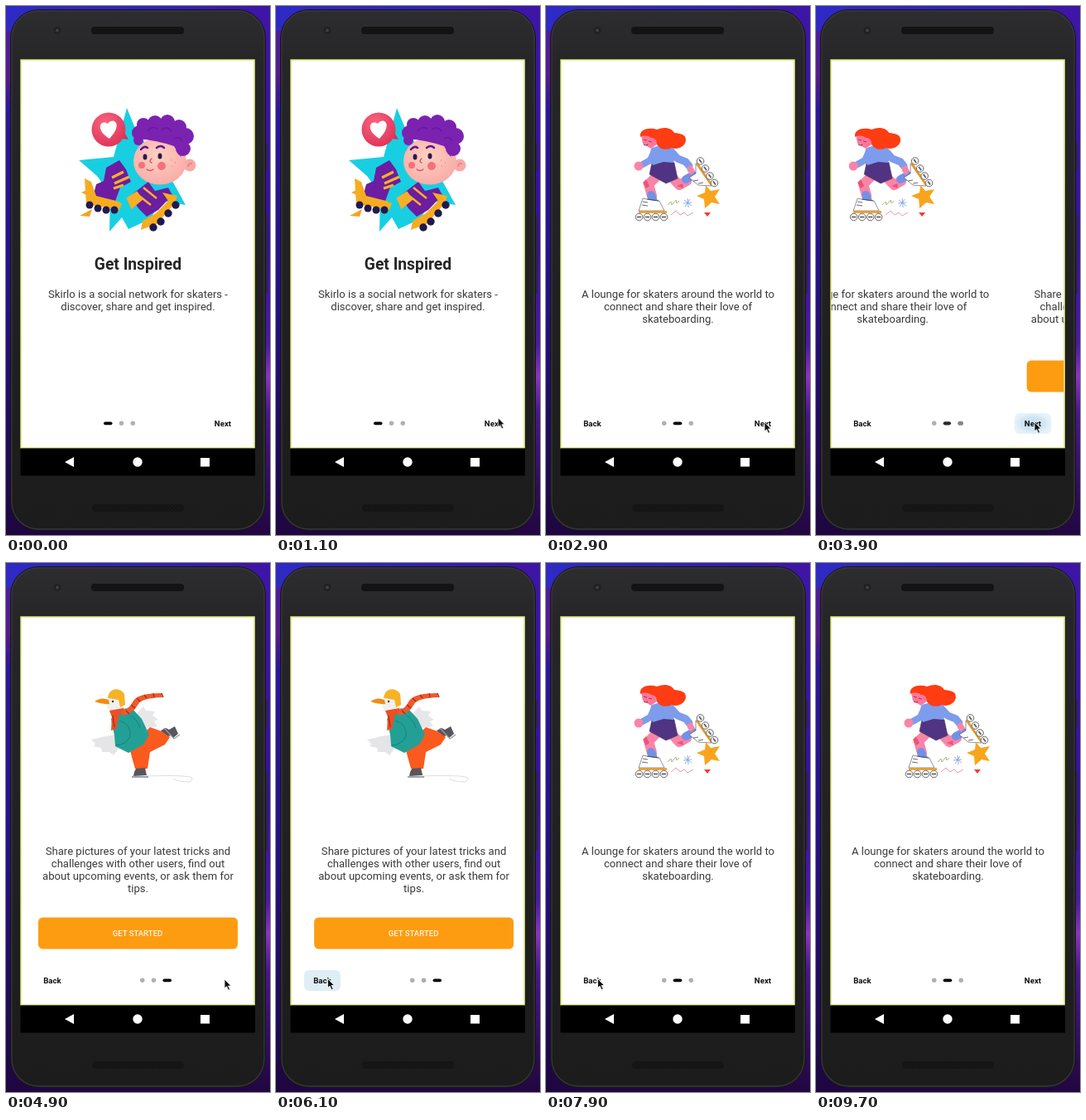
Animation of 319x638 px, one loop 9800 ms. Source, as an HTML page:

```html
<!DOCTYPE html>
<html lang="en">
<head>
<meta charset="utf-8">
<title>Skater onboarding</title>
<style>
  html, body { margin: 0; width: 100%; height: 100%; overflow: hidden; background: #1c1260; }
  svg { display: block; width: 100vw; height: 100vh; }
  text { font-family: Roboto, "Open Sans", sans-serif; }
  .title { font-size: 19.3px; font-weight: 700; fill: #252527; text-anchor: middle; }
  .body { font-size: 13.1px; fill: #39393b; text-anchor: middle; }
  .btn { font-size: 9.7px; font-weight: 700; fill: #111; text-anchor: middle; }
  .cta { font-size: 9.6px; font-weight: 500; fill: #fff6e4; text-anchor: middle; }
  .limb { fill: none; stroke-linecap: round; stroke-linejoin: round; }
</style>
</head>
<body>
<svg viewBox="0 0 319 638" xmlns="http://www.w3.org/2000/svg">
  <defs>
    <linearGradient id="sky" x2="0" y2="1">
      <stop offset="0" stop-color="#2f2ac4"/>
      <stop offset=".05" stop-color="#4c1e98"/>
      <stop offset=".13" stop-color="#561c88"/>
      <stop offset=".2" stop-color="#2c169a"/>
      <stop offset=".5" stop-color="#25128a"/>
      <stop offset=".75" stop-color="#220c66"/>
      <stop offset="1" stop-color="#1e0640"/>
    </linearGradient>
    <linearGradient id="top">
      <stop offset="0" stop-color="#2f2ac4"/>
      <stop offset=".6" stop-color="#3220bc"/>
      <stop offset="1" stop-color="#3d16a6"/>
    </linearGradient>
    <linearGradient id="edge" x2="0" y2="1">
      <stop offset="0" stop-color="#3d16a6"/>
      <stop offset=".45" stop-color="#36129c"/>
      <stop offset=".64" stop-color="#4a1c9e"/>
      <stop offset=".7" stop-color="#8a35bd"/>
      <stop offset=".77" stop-color="#4a1788"/>
      <stop offset="1" stop-color="#210640"/>
    </linearGradient>
    <linearGradient id="shell" x2="0" y2="1">
      <stop offset="0" stop-color="#2d2d2f"/>
      <stop offset=".1" stop-color="#262628"/>
      <stop offset=".85" stop-color="#1d1d1e"/>
      <stop offset="1" stop-color="#1c1c1d"/>
    </linearGradient>
    <radialGradient id="bubble" cx=".4" cy=".3" r=".8">
      <stop offset="0" stop-color="#f9647c"/>
      <stop offset="1" stop-color="#dd2f57"/>
    </radialGradient>
    <radialGradient id="skin" cx=".45" cy=".4" r=".65">
      <stop offset="0" stop-color="#ffd0c2"/>
      <stop offset="1" stop-color="#f9aaa6"/>
    </radialGradient>
    <radialGradient id="splash">
      <stop offset="0" stop-color="#c6e0f0"/>
      <stop offset=".55" stop-color="#cde4f2"/>
      <stop offset="1" stop-color="#e6f2f9"/>
    </radialGradient>
    <pattern id="mesh" width="4" height="4" patternUnits="userSpaceOnUse">
      <rect width="4" height="4" fill="#131314"/>
      <path d="M0 4 4 0" stroke="#1d1d1e" stroke-width=".8"/>
    </pattern>
    <clipPath id="view"><rect x="18" y="65" width="282.5" height="468"/></clipPath>
  </defs>

  <!-- wallpaper and handset -->
  <rect width="319" height="638" fill="url(#sky)"/>
  <rect width="319" height="30" fill="url(#top)"/>
  <rect x="285" width="34" height="638" fill="url(#edge)"/>
  <path d="M313 165h2.6v33h-2.6zM313 251h2.6v96h-2.6z" fill="#29292c"/>
  <rect x="5.5" y="4.500" width="308" height="628" rx="34" fill="url(#shell)" stroke="#151517"/>
  <rect x="7" y="6" width="305" height="625" rx="32.500" fill="none" stroke="#373739" stroke-width="1.300"/>
  <circle cx="62" cy="29.500" r="4.500" fill="#202022"/>
  <circle cx="62" cy="29.500" r="2" fill="#3f4045"/>
  <rect x="103" y="25" width="112" height="9" rx="4" fill="#131314"/>
  <rect x="104" y="601" width="111" height="9" rx="4" fill="url(#mesh)"/>

  <rect x="18" y="65" width="282.500" height="468" fill="#fff"/>
  <g clip-path="url(#view)">
    <g id="p0">
      <path d="M146 123l12 29 38 50 21 38-29-5-14 22-26 12-8-14-15 17 1-45-16-22-22-19 42-4z" fill="#18cfe2"/>
      <path d="M91 225l12-6-5 9zM89 253l15-8-3 9z" fill="#f5a31b"/>
      <path d="M121 195l16-9 8 11 6 15-13 7-7 19-27-4 5-19 9-4z" fill="#6c1da1"/>
      <path d="M128 207l14-7M131 214l18-8M130 220l12-4" fill="none" stroke="#f6b028" stroke-width="3.200"/>
      <path d="M95 208l8 4 6 17 24 6 7 3-3 8-40-7z" fill="#f6ac20"/>
      <path d="M150 229l22-17 8 11 16-4 5 9-17 18-14 8-10-10z" fill="#6c1da1"/>
      <path d="M147 232l11-7 6 8-12 10zM166 219l16 13M161 229l14 11" fill="#f6b028" stroke="#f6b028" stroke-width="2.500"/>
      <path d="M189 225l18 4-3 9-22 25-19 7 2-11 16-9 15-15z" fill="#f6ac20"/>
      <g fill="#20194f">
        <circle cx="101" cy="240" r="4.500"/><circle cx="111" cy="244" r="4.500"/>
        <circle cx="121" cy="246" r="4.500"/><circle cx="131" cy="246" r="4.500"/>
        <circle cx="178" cy="267" r="4.700"/><circle cx="187" cy="260" r="4.700"/>
        <circle cx="196" cy="250" r="4.700"/><circle cx="205" cy="240" r="4.700"/>
      </g>
      <path d="M133 159l15 2-6-10z" fill="#dd2f57"/>
      <circle cx="124" cy="149" r="20.500" fill="url(#bubble)"/>
      <path d="M125 160c-18-11-11-24-2-18 7-9 19 1 2 18z" fill="#fff"/>
      <circle cx="222" cy="192" r="7.500" fill="#f9aaa6"/>
      <path d="M220 194q0-5 5-4" fill="none" stroke="#dd7d80" stroke-width="1.300"/>
      <ellipse cx="186" cy="187" rx="32" ry="28.500" fill="url(#skin)"/>
      <g fill="#7b22b0">
        <circle cx="161" cy="153" r="9"/><circle cx="166" cy="143" r="8"/>
        <circle cx="180" cy="141" r="9"/><circle cx="195" cy="140" r="9"/>
        <circle cx="209" cy="146" r="9"/><circle cx="217" cy="157" r="10"/>
        <circle cx="214" cy="172" r="9"/><circle cx="160" cy="162" r="6"/>
        <path d="M158 160l8-16 42-2 12 20-9 20-8-13q-20-7-45-9z"/>
      </g>
      <path d="M171 151q5-7 12-3M188 149q7-5 12 2M203 160q7-4 10 3" fill="none" stroke="#651a9a" stroke-width="1.500"/>
      <path d="M163 173q4-5 8-2M182 171q5-4 9 0" fill="none" stroke="#5d188e" stroke-width="2.500" stroke-linecap="round"/>
      <ellipse cx="168" cy="182" rx="2.500" ry="3.500" fill="#251b4d"/>
      <ellipse cx="186" cy="181" rx="2.500" ry="3.500" fill="#251b4d"/>
      <circle cx="164" cy="192" r="4" fill="#f57178"/><circle cx="188" cy="193" r="5" fill="#f57178"/>
      <path d="M176 184q-4 4 0 5M170 197q4 3 8 0" fill="none" stroke="#c9566a" stroke-width="1.300" stroke-linecap="round"/>
      <path d="M199 186h1M204 189h1M200 193h1" stroke="#dc7273" stroke-width="1.200"/>
      <text class="title" x="159.500" y="318">Get Inspired</text>
      <g class="body">
        <text x="159.500" y="351.500">Skirlo is a social network for skaters -</text>
        <text x="159.500" y="366.700">discover, share and get inspired.</text>
      </g>
    </g>

    <g id="p1">
      <g class="limb">
        <path d="M148 202l13 14 9-5" stroke="#f885a8" stroke-width="12"/>
        <path d="M169 209l9-5" stroke="#7391e6" stroke-width="10"/>
        <path d="M139 200l-15 15 4 14" stroke="#f885a8" stroke-width="12"/>
        <path d="M127 228l3 8" stroke="#7391e6" stroke-width="10"/>
      </g>
      <path d="M117 213l4-4 4 8-4 3zM158 217l7-3 1 6z" fill="#ee5477"/>
      <g stroke="#4b4257" stroke-width=".6" stroke-linejoin="round">
        <path d="M181 190l19 27-16-1-11-9 8-5z" fill="#fff"/>
        <path d="M117 232l11 2 9 1 6 12h-31l2-6z" fill="#fff"/>
        <path d="M128 189l18-6 9 6 4 19-14 6-20-11z" fill="#513383"/>
      </g>
      <path d="M182 189l18 27M112 248.500h34" stroke="#e99a20" stroke-width="2.500"/>
      <path d="M117 236l6 1M116 240l7 1M178 211l6-1M184 214l6-1M122 233l14 2" stroke="#444" stroke-width=".8"/>
      <g class="limb" stroke="#7d9cec">
        <path d="M131 175l-5 11-9 5" stroke-width="8"/>
        <path d="M150 174l9 10 10 4 4 5" stroke-width="9"/>
      </g>
      <path d="M127 172q8-5 19-3 9 3 11 11l-3 9-12-1-13 4-4-9z" fill="#7d9cec"/>
      <circle cx="112" cy="193" r="5.500" fill="#f885a8"/>
      <path d="M170 195l6-3 4 7-5 5-4-5z" fill="#f885a8"/>
      <path d="M115 156l17-3 3 13-8 6-10-6z" fill="#f8789c"/>
      <path d="M114 158c-2-10 12-12 20-9 9-4 18-2 21 4 7 1 14 1 14 9-1 8-11 12-17 9-8 4-15 1-18-4 0-6-3-8-7-8-4-3-9-3-13-1z" fill="#ff3c12"/>
      <path d="M118 161l4 1M124 163l4 1M118 167q3 2 5 0" fill="none" stroke="#bb3155" stroke-width="1.100"/>
      <g fill="#f4f4f4" stroke="#6a6a6e">
        <circle cx="112.500" cy="254.500" r="4.300"/><circle cx="122.500" cy="254.500" r="4.300"/>
        <circle cx="132.500" cy="254.500" r="4.300"/><circle cx="142.500" cy="254.500" r="4.300"/>
        <circle cx="186.500" cy="187" r="4.300"/><circle cx="192.500" cy="196" r="4.300"/>
        <circle cx="198" cy="205" r="4.300"/><circle cx="203.500" cy="213.500" r="4.300"/>
      </g>
      <path d="M110 254.500h5M120 254.500h5M130 254.500h5M140 254.500h5M185 185l3 4M191 194l3 4M196.500 203l3 4M202 211.500l3 4" stroke="#555" stroke-width="1.500"/>
      <path d="M193 216l6 7 11-2-6 9 6 9-10-2-8 7-1-11-9-4 10-4z" fill="#f8a51d"/>
      <path d="M147 240l4-4 1 4 5-6 1 4 3-3" fill="none" stroke="#a3b878"/>
      <path d="M167 234l9 7M168 242l6-9M171 232l1 11M166 238l10-1" stroke="#86a2e6" stroke-width=".9"/>
      <path d="M151 252l6-5 5 5 5-3 4 4 7-4" fill="none" stroke="#ef94ac"/>
      <path d="M191 249l8 0-4 5z" fill="#ef3d35"/>
      <g class="body">
        <text x="159.500" y="351.500">A lounge for skaters around the world to</text>
        <text x="159.500" y="366.700">connect and share their love of</text>
        <text x="159.500" y="381.700">skateboarding.</text>
      </g>
    </g>

    <g id="p2">
      <path d="M169 257q28-1 45 0t8 7q-14 0-20-4" fill="none" stroke="#dedee1"/>
      <path d="M157 183l9-10 3 5 11 1-3 5 7 5-5 2 4 6-14 2z" fill="#e7e6e8"/>
      <path d="M185 208l11-7 5 5-10 8z" fill="#dd481c"/>
      <path d="M187 202l6-3 4 2 7-4 4 9-6 5-4-4-5 2z" fill="#57565e"/>
      <path d="M191 199l12 13 7-5" fill="none" stroke="#99999f" stroke-width="1.300"/>
      <path d="M149 222l25-24 14 5 10 7-6 9-18 9-3 20-15 0-4-14z" fill="#fa5a1e"/>
      <path d="M157 248l11-1 2 9-16 1 1-5z" fill="#57565e"/>
      <path d="M152 258h20" stroke="#85858a" stroke-width="1.500"/>
      <path d="M132 207l-12 2-17 4 5 5-2 3 9 2 1 5 9 0 5 4 10-14z" fill="#e5e4e6"/>
      <path d="M127 188l8-12 17-1 12 13 9 19-7 12-18 10-16-8-1-13z" fill="#23a096"/>
      <path d="M137 190q15 5 13 19-5 10-17 11M151 184q9 7 11 15" fill="none" stroke="#168078"/>
      <path d="M123 164h19l1 16-16 3-5-9z" fill="#f2eff0"/>
      <path d="M107 167q8-6 17-2l1 5q-9 1-18-3z" fill="#f28b13"/>
      <path d="M123 163c1-14 16-13 20-5l1 13-6 3-2-9z" fill="#f5b425"/>
      <circle cx="129" cy="167" r="1.200" fill="#333"/>
      <path d="M125 178l17-3 2 5-16 6z" fill="#ee4e24"/>
      <path d="M140 179q9-3 14-13 6-9 34-9l1 5q-25 1-29 8-7 13-20 14z" fill="#f0592b"/>
      <path d="M128 185l9-2-4 17-6 2z" fill="#ee4e24"/>
      <path d="M129 184l2 14M145 178l4 4M151 171l5 4M158 163l4 4M167 159l3 4M178 157l1 5M188 157l2 5" stroke="#a92d19" stroke-width="1.300"/>
      <g class="body">
        <text x="159.500" y="351.500">Share pictures of your latest tricks and</text>
        <text x="159.500" y="366.700">challenges with other users, find out</text>
        <text x="159.500" y="381.900">about upcoming events, or ask them for</text>
        <text x="159.500" y="397.100">tips.</text>
      </g>
      <rect x="39" y="427.500" width="241" height="38" rx="5.500" fill="#fd9c10"/>
      <text class="cta" x="159" y="449.800">GET STARTED</text>
    </g>
  </g>

  <!-- controls -->
  <rect id="tapNext" x="240" y="491" width="44" height="25" rx="6" fill="url(#splash)"/>
  <rect id="tapBack" x="34" y="491" width="44" height="25" rx="6" fill="#d5e7f2"/>
  <text id="back" class="btn" x="56" y="507">Back</text>
  <text id="next" class="btn" x="262" y="507">Next</text>
  <g id="dots"><rect/><rect/><rect/></g>

  <rect x="18" y="65" width="282" height="468" fill="none" stroke="#dce773" stroke-width="1.500"/>
  <rect x="17.500" y="533.500" width="283.500" height="33" fill="#000"/>
  <path d="M71 550l11-6v12zM235 545h11v10.500h-11z" fill="#fff"/>
  <circle cx="159" cy="550" r="5.700" fill="#fff"/>
  <path id="cursor" d="M0 0v11l2.600-2.300 2 4.500 2-.9-2-4.300h3.400z" fill="#111" stroke="#fff" stroke-width=".8"/>
</svg>

<script>
  const LOOP = 9800, STEP = 100, PAGE = 282.5, SLIDE = 350;
  const $ = id => document.getElementById(id);
  const mix = (a, b, k) => a + (b - a) * k;
  const clamp = k => Math.min(1, Math.max(0, k));

  // start time, page change
  const slides = [[1752, 1], [3752, 1], [6057, -1]];
  // time, x, y
  const path = [[600, 322, 430], [1200, 264, 502], [5400, 264, 502], [5900, 62.5, 501.5],
    [8400, 62.5, 501.5], [8600, 150, 534], [8900, 322, 303]];
  // press, full, release, gone
  const nextTaps = [[1550, 1800, 2050, 2650], [3550, 3800, 4050, 4600]];
  const backTaps = [[5950, 6150, 6450, 7100]];

  // cubic-bezier(.42, 0, 1, 1), solved by bisection
  function easeIn(x) {
    let lo = 0, hi = 1;
    for (let i = 0; i < 24; i++) {
      const s = (lo + hi) / 2, r = 1 - s;
      if (1.26 * s * r * r + 3 * s * s * r + s ** 3 < x) lo = s; else hi = s;
    }
    return lo * lo * (3 - 2 * lo);
  }

  function cursorAt(t) {
    const i = path.findIndex(p => p[0] > t);
    if (i < 1) return [340, 430];
    const [a, b] = [path[i - 1], path[i]];
    const k = (t - a[0]) / (b[0] - a[0]), e = k * k * (3 - 2 * k);
    return [mix(a[1], b[1], e), mix(a[2], b[2], e)];
  }

  const tapLevel = (taps, t) => Math.max(...taps.map(([a, b, c, d]) =>
    Math.min(clamp((t - a) / (b - a)), clamp((d - t) / (d - c)))));

  const dots = [...$('dots').children];
  function drawDots(page, near) {
    let x = 137 + 22 * near - 19;
    dots.forEach((dot, i) => {
      const on = clamp(1 - Math.abs(page - i));
      const w = mix(5.5, 10.5, on), h = mix(5.5, 3.8, on), v = Math.round(mix(176, 0, on));
      const box = { x, y: 503.3 - h / 2, width: w, height: h, rx: h / 2, fill: `rgb(${v},${v},${v})` };
      for (const key in box) dot.setAttribute(key, box[key]);
      x += w + 8.25;
    });
  }

  function draw(t) {
    const page = slides.reduce((p, [at, by]) => p + by * easeIn(clamp((t - at) / SLIDE)), 0);
    const near = Math.round(page);
    for (let i = 0; i < 3; i++) $('p' + i).setAttribute('transform', `translate(${(i - page) * PAGE} 0)`);
    drawDots(page, near);
    $('back').style.opacity = near > 0 ? 1 : 0;
    $('next').style.opacity = near < 2 ? 1 : 0;
    $('tapNext').style.opacity = near < 2 ? tapLevel(nextTaps, t) : 0;
    $('tapBack').style.opacity = tapLevel(backTaps, t);
    $('cursor').setAttribute('transform', `translate(${cursorAt(t)})`);
  }

  let start;
  function tick(now) {
    start ??= now;
    draw(Math.floor((now - start) % LOOP / STEP) * STEP);
    requestAnimationFrame(tick);
  }
  draw(0);
  requestAnimationFrame(tick);
</script>
</body>
</html>
```
